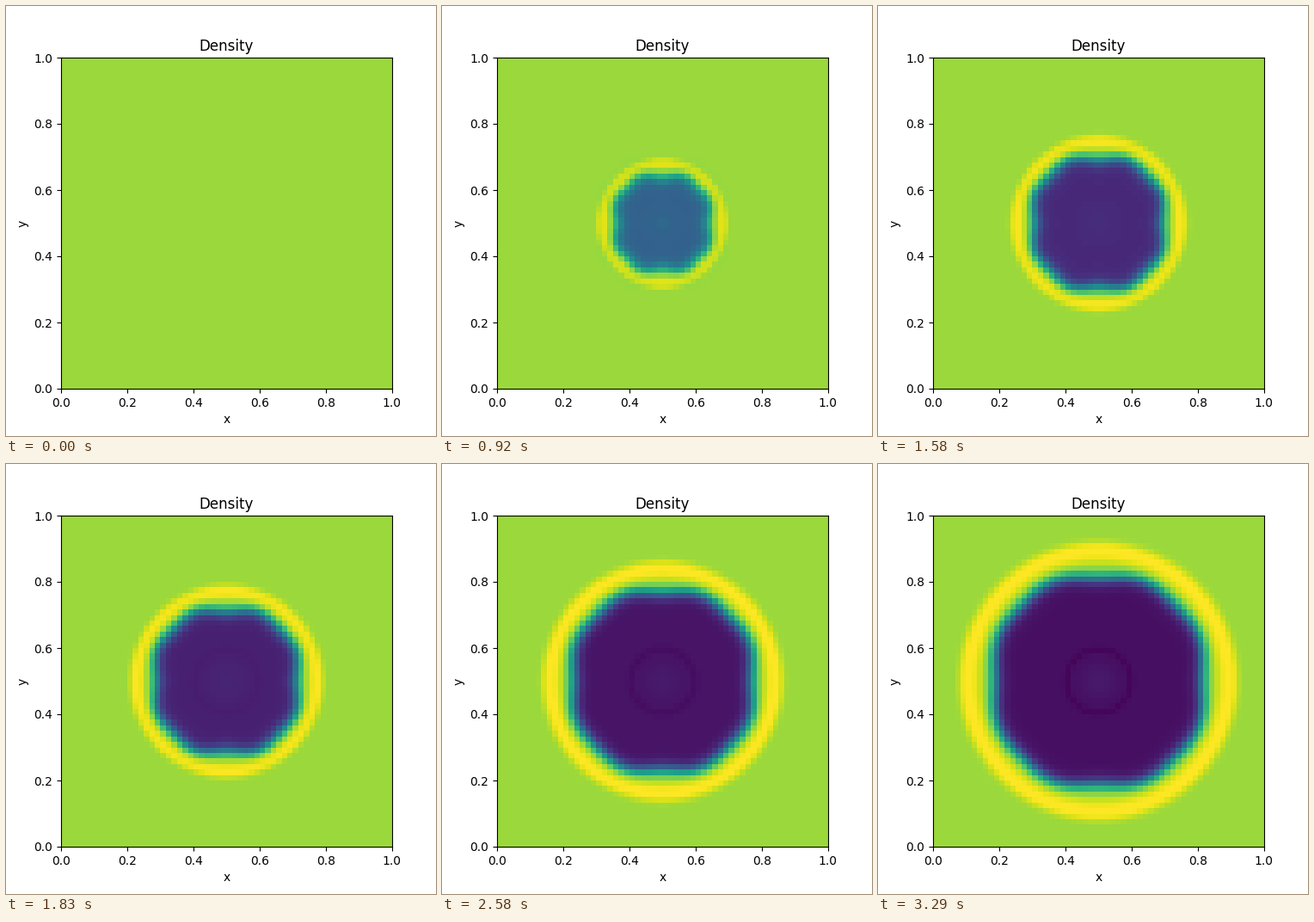
These frames come from a looping animation (500 by 500 pixels, 3330 ms). A matplotlib script:

```python
import numpy as np
import matplotlib.pyplot as plt
from matplotlib.animation import FuncAnimation

CELLS = 60
FRAMES = 80
LOOP_MS = 3330
AMBIENT = 0.8495  # colour level of the undisturbed gas
BLAST = 6  # starting radius in cells

axis = np.arange(CELLS) - (CELLS - 1) / 2
X, Y = np.meshgrid(axis, axis)
R = np.hypot(X, Y)
THETA = np.arctan2(Y, X)
# The contact surface is flattened along the grid axes
OCTAGON = 0.4 * (1 - np.cos(4 * THETA)) + 0.35 * (1 - np.cos(8 * THETA))


def logistic(d, slope):
    return 1 / (1 + np.exp(-slope * d))


def shock_radius(n):
    """Power-law expansion, starting smoothly from the blast radius."""
    return (BLAST ** 6 + (1.567 * n ** 0.62) ** 6) ** (1 / 6)


def density(n):
    """Density level on the grid after n steps."""
    if n < 2:
        return np.full_like(R, AMBIENT)
    age = n / (FRAMES - 1)
    front = shock_radius(n)
    contact = max(5.6, 0.82 * front - 0.55)

    # Evacuated bubble, opened by a rarefaction running to the centre
    cavity = 0.03 + (AMBIENT - 0.03) / (1 + (n / 17.5) ** 2.87)
    inside = logistic(contact + OCTAGON * min(n / 15, 1) - R, 1.45)
    opened = logistic(R - 5.5 + 0.44 * (n - 1), 0.8)
    level = AMBIENT - (AMBIENT - cavity) * inside * opened

    # Compressed shell: steep at the shock, softer behind it
    peak = 0.156 * (1 - np.exp(-(n - 1) / 12))
    d = R - front
    ahead = np.exp(-np.abs(d / (0.5 + 0.055 * front)) ** 3)
    behind = np.exp(-(d / (0.7 + 0.075 * front)) ** 2)
    level += peak * np.where(d > 0, ahead, behind)

    # Faint core and rim left at the blast radius
    level += 0.03 * age * np.exp(-(R / 3) ** 2)
    level -= 0.03 * age ** 2 * np.exp(-((R - 5.8) / 0.6) ** 2)
    return np.clip(level, 0, 1)


fig, ax = plt.subplots(figsize=(5, 5), dpi=100)
image = ax.imshow(density(0), origin="lower", extent=(0, 1, 0, 1),
                  cmap="viridis", vmin=0, vmax=1, interpolation="nearest")
ax.set_title("Density")
ax.set_xlabel("x")
ax.set_ylabel("y")


def update(n):
    image.set_data(density(n))
    return (image,)


anim = FuncAnimation(fig, update, frames=FRAMES, interval=LOOP_MS / FRAMES,
                     repeat=True, repeat_delay=0)
plt.show()
```
